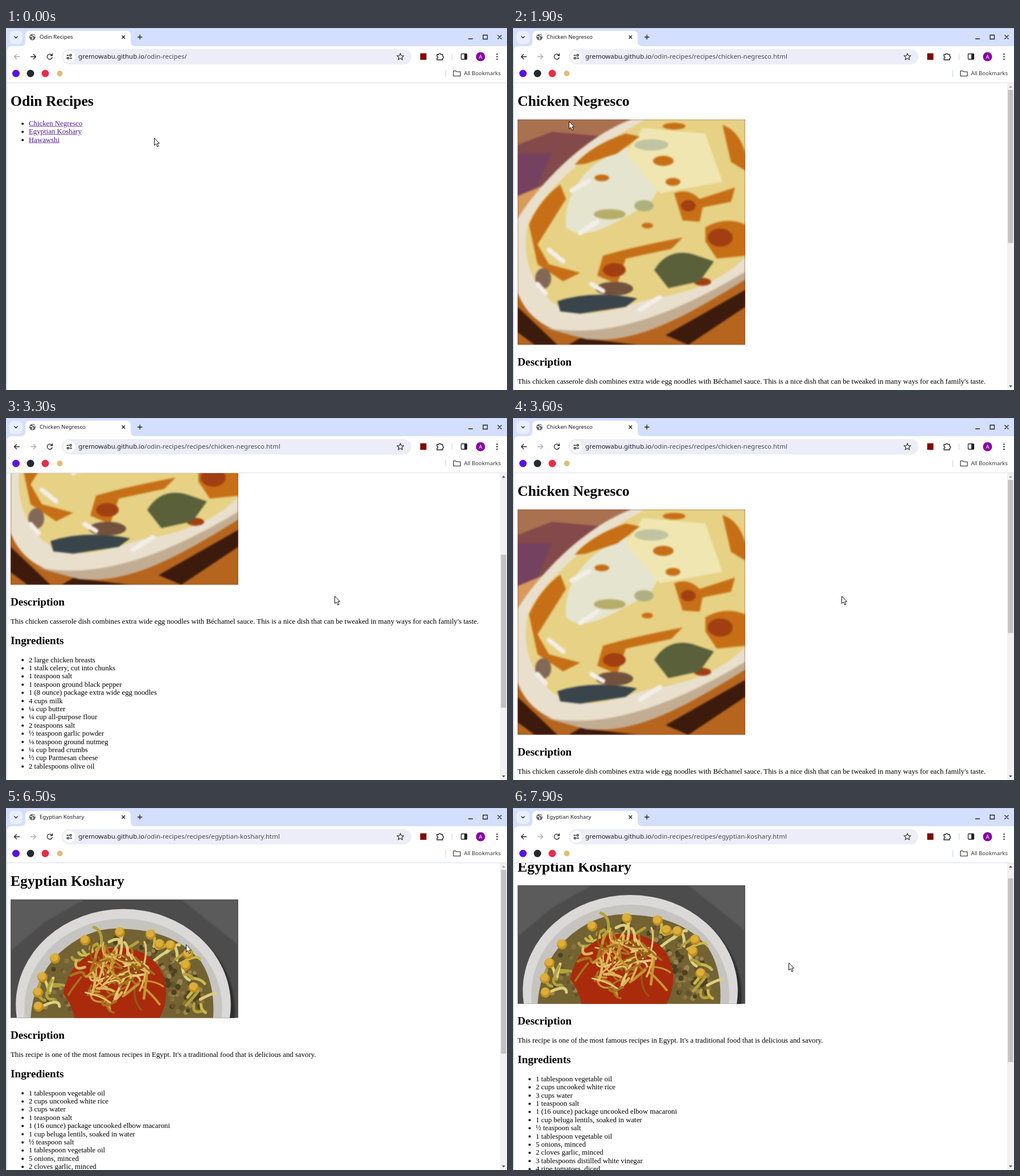
Write an HTML page that moves like this. It is 880 px wide and 637 px high and loops after 8 s.

```html
<!DOCTYPE html>
<html lang="en">
<head>
<meta charset="utf-8">
<title>Recipes</title>
<style>
html, body { margin: 0; width: 880px; height: 637px; overflow: hidden; background: #d4dfff; }
#stage { position: relative; width: 880px; height: 637px; overflow: hidden; }
#ui, #top { position: absolute; left: 0; top: 0; }
svg text, #status { font-family: "Noto Sans", sans-serif; font-size: 9.6px; }
.ico { fill: none; stroke: #222; stroke-width: 1.3; }
.off { stroke: #a9a9ae; }
/* The browser content is laid out at full size and shown at 80 % */
#zoom { position: absolute; left: 0; top: 0; width: 1100px; height: 797px; transform: scale(.8); transform-origin: 0 0; }
#view { position: absolute; left: 2px; top: 121px; width: 1098px; height: 676px; overflow: hidden; background: #fff; font: 16px "Liberation Serif", serif; color: #000; }
.page { display: none; width: 1067px; padding: 0 8px; }
.page.on { display: flow-root; }
.page a { color: #551a8b; text-decoration: underline; }
.photo { overflow: hidden; width: 500px; }
.soft { filter: blur(1.5px); }
#status { position: absolute; left: 2px; top: 618px; width: 278px; height: 19px; line-height: 19px; padding: 0 7px 0 6px; overflow: hidden; white-space: nowrap; text-overflow: ellipsis; background: #edeff9; color: #3c4043; border-radius: 0 4px 0 0; }
</style>
</head>
<body>
<div id="stage">
<div id="zoom"><div id="view">
  <div class="page">
    <h1>Odin Recipes</h1>
    <ul><li><a>Chicken Negresco</a></li><li><a>Egyptian Koshary</a></li><li><a>Hawawshi</a></li></ul>
  </div>

  <div class="page">
    <h1>Chicken Negresco</h1>
    <svg class="photo" height="496" viewBox="0 0 400 397">
      <rect width="400" height="397" fill="#84494a"/>
      <g class="soft">
        <path d="M0 0H200L150 30 60 22 0 45z" fill="#a9714f"/>
        <path d="M0 60L60 60 30 130 0 150z" fill="#744260"/>
        <path d="M0 135L60 110 0 200z" fill="#d99a5c"/>
        <path d="M0 290V397H400V270z" fill="#b5651d"/>
        <path d="M0 330L70 397H30L0 375zM90 397L110 385 210 397zM260 380L400 300V330L300 397z" fill="#3c1a0c"/>
        <path d="M200 0C120 30 40 110 0 175V305C15 345 50 378 125 383C230 385 330 320 400 275V0z" fill="#e9dfcd"/>
        <path d="M40 365C130 385 240 365 400 268V282C290 350 210 395 120 387z" fill="#c3ad92"/>
        <path d="M225 0C150 40 55 110 20 180C5 230 20 290 65 325C120 360 180 330 230 317C300 305 350 290 400 243V0z" fill="#e6d184"/>
        <path d="M190 50C120 75 80 130 85 190C120 220 170 180 230 150C270 100 270 40 190 50z" fill="#e5e5cf"/>
        <path d="M220 15L330 25 360 110 250 130 190 60z" fill="#efe6b2"/>
        <g fill="#c66f16">
          <path d="M100 80Q130 45 190 25L215 30 175 60 120 78z"/>
          <path d="M20 185Q40 140 75 115L85 140 60 180 35 220 55 255 110 270 80 285 35 255z"/>
          <path d="M150 240Q200 225 290 208L270 228 190 245 175 290 140 275z"/>
          <path d="M275 130Q300 120 320 140L382 120 375 145 325 155 320 180 290 178z"/>
          <path d="M330 190Q365 170 400 185V240L350 245 330 215z"/>
          <path d="M360 10Q390 20 400 60V90L375 75z"/>
          <ellipse cx="256" cy="73" rx="18" ry="9"/>
          <ellipse cx="273" cy="110" rx="13" ry="7"/>
          <ellipse cx="148" cy="103" rx="13" ry="6"/>
          <ellipse cx="228" cy="187" rx="10" ry="5"/>
          <ellipse cx="275" cy="12" rx="20" ry="6"/>
        </g>
        <g fill="#a13e12">
          <ellipse cx="356" cy="208" rx="22" ry="16"/>
          <ellipse cx="170" cy="265" rx="20" ry="12"/>
          <ellipse cx="300" cy="152" rx="13" ry="10"/>
          <ellipse cx="325" cy="286" rx="15" ry="7"/>
        </g>
        <g fill="#59603a">
          <path d="M240 265Q265 225 310 238L345 250 320 285 265 297z"/>
          <path d="M70 320Q130 300 210 315L190 330 110 342 75 338z" fill="#39454a"/>
          <ellipse cx="170" cy="298" rx="33" ry="12" fill="#72513d"/>
          <ellipse cx="222" cy="152" rx="17" ry="10" fill="#aeb082"/>
          <ellipse cx="162" cy="167" rx="28" ry="9" fill="#b5ad69"/>
          <ellipse cx="235" cy="45" rx="30" ry="10" fill="#c1c3a1"/>
          <ellipse cx="45" cy="280" rx="14" ry="18" fill="#836857"/>
        </g>
        <path d="M95 125l30-16M110 200l30-20M55 230l25 20M130 290l20 12M215 335l35-22M35 290l14 16" stroke="#f3efe8" stroke-width="8" stroke-linecap="round"/>
      </g>
    </svg>
    <h2>Description</h2>
    <p>This chicken casserole dish combines extra wide egg noodles with Béchamel sauce. This is a nice dish that can be tweaked in many ways for each family's taste.</p>
    <h2>Ingredients</h2>
    <ul><li>2 large chicken breasts</li><li>1 stalk celery, cut into chunks</li><li>1 teaspoon salt</li><li>1 teaspoon ground black pepper</li><li>1 (8 ounce) package extra wide egg noodles</li><li>4 cups milk</li><li>¼ cup butter</li><li>¼ cup all-purpose flour</li><li>2 teaspoons salt</li><li>½ teaspoon garlic powder</li><li>⅛ teaspoon ground nutmeg</li><li>¼ cup bread crumbs</li><li>½ cup Parmesan cheese</li><li>2 tablespoons olive oil</li></ul>
    <h2>Steps</h2>
    <ol>
      <li>Combine chicken, celery, 1 teaspoon salt, and black pepper in a saucepan. Pour enough water into the saucepan to cover the ingredients completely. Bring water to a boil and cook until the chicken is no longer pink in the center and the juices run clear, 20 to 25 minutes. An instant-read thermometer inserted into the center should read at least 165 degrees F (74 degrees C). Remove chicken to a cutting board to cool. Cut cooled chicken into bite-sized pieces. Discard water and celery.</li>
      <li>Preheat oven to 350 degrees F (175 degrees C). Grease a 9x13-inch casserole dish with cooking spray.</li>
      <li>Bring a large pot of lightly salted water to a boil. Cook egg noodles in the boiling water, stirring occasionally, until cooked through but firm to the bite, about 5 minutes. Drain.</li>
      <li>Heat milk in a saucepan over medium heat until warm. Melt butter in a second saucepan and whisk in flour until smooth. Pour in the warm milk slowly, whisking all the time, until the sauce thickens, about 10 minutes. Season with 2 teaspoons salt, garlic powder, and nutmeg.</li>
      <li>Stir noodles and chicken into the sauce and pour into the prepared dish.</li>
      <li>Mix bread crumbs, Parmesan cheese, and olive oil in a bowl until crumbly. Spread evenly over the noodles.</li>
      <li>Bake in the preheated oven until the top is golden brown, about 30 minutes.</li>
      <li>Let stand for 5 minutes before serving.</li>
    </ol>
  </div>

  <div class="page">
    <h1>Egyptian Koshary</h1>
    <svg class="photo" height="261" viewBox="0 0 400 209">
      <rect width="400" height="209" fill="#4c4c4d"/>
      <g class="soft">
        <path d="M0 90L60 40 130 0H0zM300 0L400 80V0z" fill="#5b5b5c"/>
        <ellipse cx="204" cy="197" rx="190" ry="175" fill="#2d2d2e"/>
      </g>
      <ellipse cx="198" cy="186" rx="189" ry="169" fill="#dad9d7"/>
      <ellipse cx="198" cy="192" rx="174" ry="158" fill="#c6c4c0"/>
      <path d="M35 209Q40 140 85 95Q140 45 200 52Q290 55 335 110Q360 150 356 209z" fill="#736333"/>
      <g id="bowl" fill="none" stroke-linecap="round"></g>
    </svg>
    <h2>Description</h2>
    <p>This recipe is one of the most famous recipes in Egypt. It's a traditional food that is delicious and savory.</p>
    <h2>Ingredients</h2>
    <ul><li>1 tablespoon vegetable oil</li><li>2 cups uncooked white rice</li><li>3 cups water</li><li>1 teaspoon salt</li><li>1 (16 ounce) package uncooked elbow macaroni</li><li>1 cup beluga lentils, soaked in water</li><li>½ teaspoon salt</li><li>1 tablespoon vegetable oil</li><li>5 onions, minced</li><li>2 cloves garlic, minced</li><li>3 tablespoons distilled white vinegar</li><li>4 ripe tomatoes, diced</li><li>½ cup tomato paste</li><li>1 ½ teaspoons salt</li><li>1 teaspoon ground black pepper</li><li>2 ½ teaspoons ground cumin</li><li>¼ teaspoon cayenne pepper</li></ul>
    <h2>Steps</h2>
    <ol>
      <li>Heat 1 tablespoon vegetable oil in a saucepan over medium-high heat. Stir rice into the oil and fry for 3 minutes. Pour in 3 cups water and 1 teaspoon salt and bring to a boil. Reduce heat to low, cover, and simmer until the rice is tender and the water is absorbed, 20 to 25 minutes.</li>
      <li>Fill a large pot with lightly salted water and bring to a rolling boil. Stir in the macaroni and return to a boil. Cook, stirring occasionally, until the macaroni is cooked through but still firm to the bite, about 8 minutes. Drain well and return to the pot.</li>
      <li>Soak lentils for 30 minutes. Drain, rinse, and drain again. Bring 2 cups water to a boil in a pot and stir in lentils. Bring to a boil, cover, and reduce heat to low. Simmer until lentils are tender, 15 to 20 minutes. Stir in ½ teaspoon salt.</li>
      <li>Heat 1 tablespoon vegetable oil in a large skillet over medium-high heat. Cook onions in oil, stirring often, until they begin to brown, 10 to 15 minutes. Add garlic and cook another minute. Remove from heat and drain on a paper towel.</li>
      <li>Place half of the onions in a saucepan. Mix in vinegar, tomatoes, tomato paste, salt, black pepper, cumin, and cayenne. Bring to a boil, reduce heat to medium-low, and simmer for 12 minutes.</li>
      <li>Serve in layers: rice, lentils, and macaroni, then sauce, with the remaining onions on top.</li>
    </ol>
  </div>
</div></div>

<svg id="ui" width="880" height="637" viewBox="0 0 880 637">
  <rect width="880" height="32" fill="#d4dfff"/>
  <rect width="880" height="1" fill="#c3cdec"/>
  <rect width="2" height="637" fill="#d4dfff"/>
  <rect x="6" y="5" width="23" height="23" rx="7" fill="#e9effe"/>
  <path d="M2 97V40Q2 32 10 32H26Q34 32 34 24V13Q34 5 42 5H211Q219 5 219 13V24Q219 32 227 32H880V97z" fill="#fff"/>
  <rect x="2" y="96" width="878" height="1" fill="#dcdfe6"/>
  <rect x="98" y="37" width="614" height="27" rx="13.5" fill="#ecedf8"/>
  <circle cx="111" cy="50.5" r="10.5" fill="#fff"/>
  <circle cx="46.5" cy="16" r="5.5" fill="#5f6368"/>
  <path d="M42.5 15q2-1 4 1t-1 4M47 11.5q0 2 2 2t2 2" stroke="#fff" fill="none" stroke-width="1.5"/>
  <g class="ico">
    <path d="M14.5 14.5l3 3 3-3M203.5 13.2l5.6 5.6m0-5.6l-5.6 5.6M231 16h8.400M235.200 11.800v8.400"/>
    <path d="M812 19h8M838 12.500h7.500v7h-7.500zM863.500 12.500l7 7m0-7l-7 7"/>
    <path d="M80.800 48a4.600 4.600 0 1 0 .6 3.500M81.500 44.800v3.700h-3.700"/>
    <path d="M106.500 48h4M106.500 53h1M112 53h4"/>
    <circle cx="113.500" cy="48" r="1.600"/><circle cx="109" cy="53" r="1.600"/>
    <path d="M692.700 44.800l1.700 3.800 4.100.4-3.100 2.700.9 4-3.600-2.100-3.600 2.100.9-4-3.100-2.700 4.100-.4z" stroke-width="1.100"/>
    <path d="M757 46.500h3.300a1.700 1.700 0 0 1 3.400 0h3.300v3.300a1.700 1.700 0 0 1 0 3.400v2.800h-10v-2.800a1.700 1.700 0 0 0 0-3.400z"/>
    <rect x="799.500" y="45.500" width="10" height="9.500" rx="1"/>
    <path d="M786 75.500h4l1.500 1.500h6.500v7.500h-12z" stroke-width="1.100"/>
  </g>
  <rect x="805" y="46" width="4.500" height="9" fill="#222"/>
  <g fill="#222"><circle cx="862.500" cy="46" r="1.200"/><circle cx="862.500" cy="50.500" r="1.200"/><circle cx="862.500" cy="55" r="1.200"/></g>
  <path d="M783.500 45v11M772.500 74v12" stroke="#c6d2f5"/>
  <rect x="727.500" y="44.500" width="11" height="11.500" fill="#800a0a"/>
  <circle cx="833.500" cy="50.500" r="8" fill="#8500a3"/>
  <text x="833.500" y="54" fill="#fff" text-anchor="middle">A</text>
  <circle cx="17.500" cy="80" r="6.500" fill="#5a12e4"/>
  <circle cx="43" cy="80" r="6.500" fill="#24292f"/>
  <circle cx="69" cy="80" r="6.500" fill="#e92c49"/>
  <circle cx="94.500" cy="80" r="5" fill="#dfbd78"/>
  <text x="804.500" y="83.200" fill="#333">All Bookmarks</text>
  <text id="title" x="59" y="19.400" fill="#1f1f1f"></text>
  <text x="127" y="54.400" fill="#202124" style="font-size:11.44px">gremowabu.github.io<tspan id="path" fill="#4a4c50"></tspan></text>
  <circle id="hover" cx="19" cy="50.500" r="13.500" fill="#dfe1e1"/>
  <path id="back" class="ico" d="M24 50.500h-9M19 46l-4.500 4.500 4.500 4.500"/>
  <path id="fwd" class="ico" d="M43 50.500h9M48 46l4.500 4.500-4.500 4.500"/>
  <g id="bar">
    <rect x="868" y="97" width="12" height="540" fill="#f1f1f1"/>
    <rect id="thumb" x="869.500" width="9" fill="#c1c1c1"/>
    <path id="up" d="M871 105l3-3.500 3 3.500z"/>
    <path id="down" d="M871 629l3 3.500 3-3.500z"/>
  </g>
</svg>
<div id="status">https://gremowabu.github.io/odin-recipes/recipes/chicken-negresco.html</div>
<svg id="top" width="880" height="637" viewBox="0 0 880 637">
  <g id="cursor" stroke="#111" fill="#fff" stroke-linejoin="round">
    <path id="arrow" d="M.5.5V13.500L3.500 10.800 5.800 16 8 15 5.800 10H9.500z"/>
    <path id="hand" d="M-1.200 9V1.200Q0-.2 1.200 1.200V6Q2.500 5 3.600 6.500Q5 5.500 6 7Q8 6.500 8.300 8.500V12L7 16H-.5L-4.500 10.500Q-4.500 8.500-2.800 8.800z"/>
  </g>
</svg>
</div>
<script>
const $ = id => document.getElementById(id);
const LOOP = 8000, TICK = 100;
const view = $('view'), pages = [...document.querySelectorAll('.page')];
const sites = [
  ['Odin Recipes', ''],
  ['Chicken Negresco', 'recipes/chicken-negresco.html'],
  ['Egyptian Koshary', 'recipes/egyptian-koshary.html']
];
const END = 9999;

// [time, page], [time, scroll], [time, opacity]: held until the next entry
const visits = [[0, 0], [1400, 1], [5000, 0], [6500, 2]];
const scrolls = [[0, 0], [2700, 451], [2900, 565], [3000, END], [3300, 330], [3500, 60], [3600, 0],
  [6900, 62], [7000, 112.5], [7200, END], [7700, 290], [7800, 120], [7900, 31]];
const bubble = [[0, 0], [1200, .5], [1300, 1], [1700, .5], [1800, 0]];
const hovers = [[0, 0], [5000, 1], [5100, .8], [5300, 0]];
const hands = [[0, 0], [1000, 1], [1700, 0], [6100, 1], [6500, 0]];

// [time, x, y]: straight lines between the entries
const moves = [[0, 260, 193], [400, 260, 193], [700, 190, 189], [1000, 106, 168], [1200, 98, 164], [1900, 98, 164],
  [2000, 205, 195], [2100, 430, 278], [2200, 577, 313], [3900, 577, 313], [4200, 117, 84], [4300, 117, 84],
  [4400, 87, 61], [4500, 87, 61], [4600, 16, 47], [5200, 16, 47], [5600, 249, 285], [5900, 119, 185],
  [6400, 119, 185], [6500, 316, 240], [6600, 316, 240], [6700, 483, 352], [6800, 483, 352], [6900, 484, 272], [8000, 484, 272]];

const held = (keys, t) => keys.filter(k => k[0] <= t).pop()[1];

function along(keys, t) {
  const i = keys.findIndex(k => k[0] > t), a = keys[i - 1], b = keys[i];
  const p = (t - a[0]) / (b[0] - a[0]);
  return [1, 2].map(n => a[n] + (b[n] - a[n]) * p);
}

function fillBowl() {
  let seed = 7, out = '';
  const rnd = (a, b) => a + (b - a) * ((seed = seed * 16807 % 2147483647) / 2147483647);
  const pick = list => list[Math.floor(rnd(0, list.length))];
  const dot = (x, y, r, c) => out += `<circle cx="${x}" cy="${y}" r="${r}" fill="${c}"/>`;
  const strand = (x, y, len, w, c) => {
    const a = rnd(0, 6.3), dx = Math.cos(a) * len, dy = Math.sin(a) * len, b = rnd(-14, 14);
    out += `<path d="M${x} ${y}q${dx / 2 + b} ${dy / 2 - b} ${dx} ${dy}" stroke="${c}" stroke-width="${w}"/>`;
  };
  for (let i = 0; i < 170; i++) {
    const a = rnd(3.1, 6.4), r = rnd(.55, .95);
    dot(197 + Math.cos(a) * 155 * r, 190 + Math.sin(a) * 130 * r, rnd(3, 5), pick(['#655329', '#8a713d', '#4e411f', '#9b8550']));
  }
  for (let i = 0; i < 34; i++) {
    const a = rnd(3.1, 6.4);
    strand(197 + Math.cos(a) * 138, 195 + Math.sin(a) * 122, rnd(15, 36), 5, pick(['#c8b94d', '#b3a13b', '#dccf7e']));
  }
  out += '<path d="M92 165Q105 105 160 88Q230 75 262 120Q285 165 262 209H112Q108 185 92 165z" fill="#a92b0c"/>';
  for (let i = 0; i < 85; i++) {
    const a = rnd(0, 6.3), r = Math.sqrt(rnd(0, 1));
    strand(185 + Math.cos(a) * 62 * r, 137 + Math.sin(a) * 46 * r, rnd(18, 48), rnd(2.5, 5), pick(['#c79531', '#dcb65a', '#a9721e', '#e3c778', '#8d5c17']));
  }
  for (const [x, y] of [[56, 137], [48, 164], [49, 189], [78, 104], [131, 72], [192, 58], [246, 62], [262, 79], [281, 81], [308, 116], [322, 155], [312, 96]]) {
    dot(x, y, 9, '#c28f1e');
    dot(x - 1, y - 2, 7, '#dcae3c');
  }
  $('bowl').innerHTML = out;
}

let shown = -1, size = 0;
function open(n) {
  pages.forEach((p, i) => p.classList.toggle('on', i === n));
  size = view.scrollHeight;
  $('title').textContent = sites[n][0];
  $('path').textContent = '/odin-recipes/' + sites[n][1];
  $('back').classList.toggle('off', !n);
  $('fwd').classList.toggle('off', n > 0);
  $('bar').style.display = n ? '' : 'none';
  shown = n;
}

function draw(time) {
  const t = Math.floor(time % LOOP / TICK) * TICK;
  const n = held(visits, t);
  if (n !== shown) open(n);

  const max = size - view.clientHeight, pos = Math.min(held(scrolls, t), max);
  view.scrollTop = pos;
  $('thumb').setAttribute('y', 109 + 518 * pos / size);
  $('thumb').setAttribute('height', 518 * view.clientHeight / size);
  $('up').setAttribute('fill', pos ? '#505050' : '#a3a3a3');
  const atEnd = pos === max && !(t >= 7200 && t < 7400);
  $('down').setAttribute('fill', atEnd ? '#a3a3a3' : '#505050');

  $('status').style.opacity = held(bubble, t);
  const glow = held(hovers, t);
  $('hover').style.opacity = glow;
  $('back').style.opacity = glow ? .35 : 1;

  const hand = held(hands, t);
  $('hand').style.display = hand ? '' : 'none';
  $('arrow').style.display = hand ? 'none' : '';
  $('cursor').setAttribute('transform', `translate(${along(moves, t)})`);
}

fillBowl();
const start = performance.now();
function loop() {
  draw(performance.now() - start);
  requestAnimationFrame(loop);
}
loop();
</script>
</body>
</html>
```
